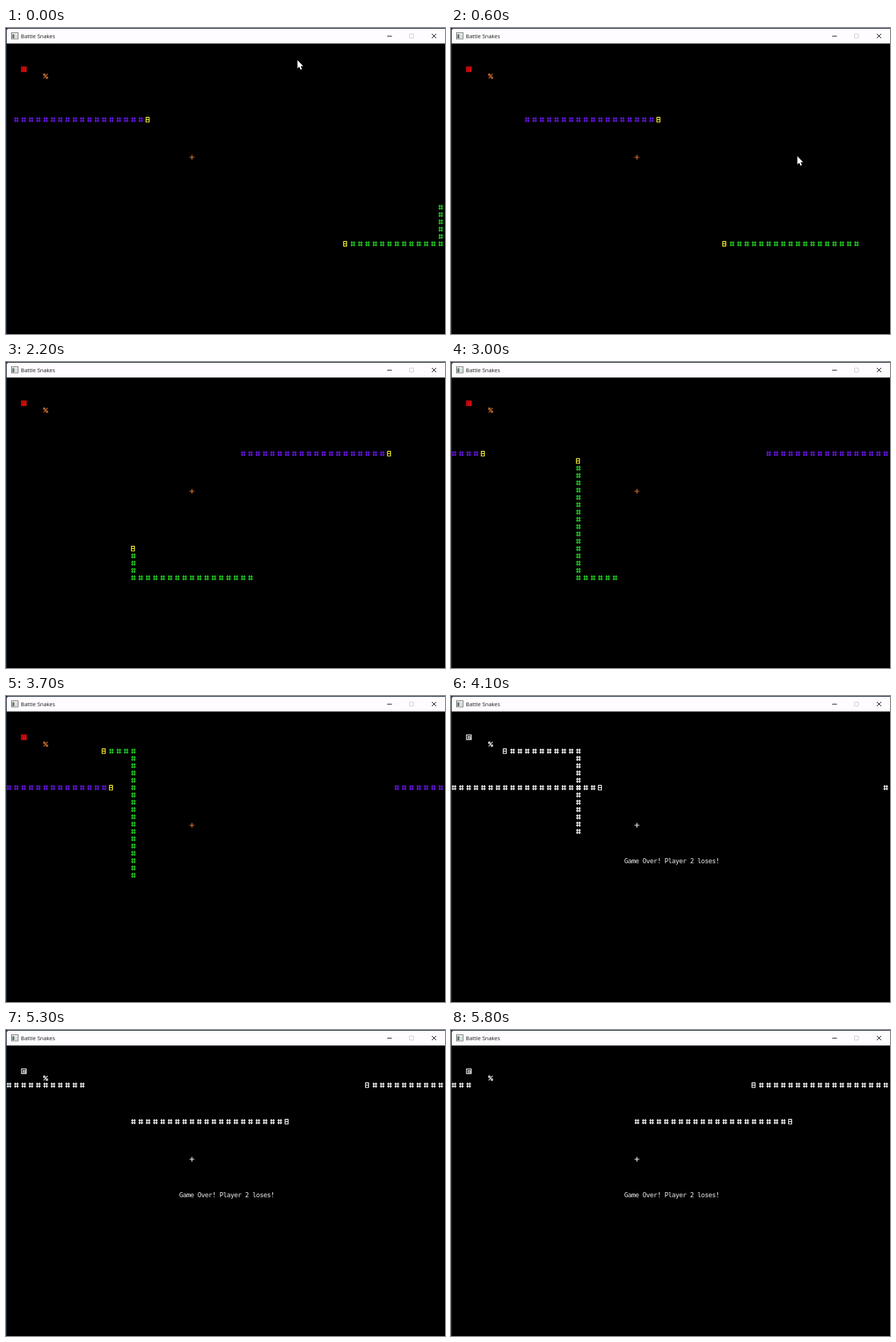
These frames come from a looping animation (600 px wide and 419 px high, 5.9 s). An HTML page:

```html
<!DOCTYPE html>
<html lang="en">
<head>
<meta charset="utf-8">
<title>Battle Snakes</title>
<style>
  html, body { margin: 0; width: 100%; height: 100%; overflow: hidden; background: #000; }
  svg { display: block; }
  .glyph { fill: none; stroke-width: 1.15; }
  .title { font: 7.5px "Open Sans", "Noto Sans", sans-serif; fill: #1a1a1a; }
  .message { font: 9px "DejaVu Sans Mono", monospace; letter-spacing: -0.42px; fill: #f2f2f2; }
</style>
</head>
<body>
<svg width="600" height="419" viewBox="0 0 600 419">
  <rect width="600" height="419" fill="#283246"/>
  <path d="M1 419V3.500Q1 1 3.500 1H600V419Z" fill="#000"/>
  <path d="M1 21.300V3.500Q1 1 3.500 1H600V21.300Z" fill="#fefcfe"/>

  <rect x="7.500" y="6.500" width="9" height="8.500" fill="#f4f6f4" stroke="#777" stroke-width="0.900"/>
  <rect x="8.500" y="8.500" width="3" height="5.500" fill="#64756e"/>
  <rect x="12.500" y="8.500" width="3" height="5.500" fill="#d3dbd7"/>
  <text class="title" x="20.300" y="14">Battle Snakes</text>
  <g fill="none" stroke="#222" stroke-width="1">
    <path d="M521 11.200H527.500"/>
    <rect x="551.500" y="8.300" width="5.500" height="5.500" rx="0.800" stroke="#cfcdcf"/>
    <path d="M582 8L588 14M588 8L582 14"/>
  </g>

  <g class="glyph">
    <g id="at">
      <rect x="21.200" y="53.300" width="6.400" height="6.400" fill="#900"/>
      <path d="M27.500 58H23.500V55.500H26V58"/>
    </g>
    <path id="percent" d="M56.800 62.800L51.500 69M51.500 63H53.300V65H51.500ZM55 67H56.800V69H55Z"/>
    <path id="plus" d="M250.800 177H257.400M254.100 173.700V180.300"/>
    <path id="body1"/>
    <path id="body2"/>
    <path id="heads"/>
  </g>
  <text class="message" id="message" x="236.800" y="229">Game Over! Player 2 loses!</text>
  <path id="cursor" d="M0 0V11.200L2.500 8.900L4.300 13L6.200 12.200L4.400 8.200H7.800Z" fill="#fff"/>
</svg>
<script>
const LOOP = 5900, TICK = 100, COLUMNS = 60;
const STEPS_PER_TICK = 1.5, CRASH_STEP = 58, GROW_EVERY = 15;
const WHITE = "#f2f2f2";
const COLORS = {
  at: "#e81212", percent: "#d97530", plus: "#d97530",
  body1: "#6415dc", body2: "#20c722", heads: "#f2ea30"
};
const el = id => document.getElementById(id);

// Head cell [column, row] of each snake after a number of steps.
const purple = s => [19 + s, 12];
function green(s) {
  if (s < -13) return [59, 42 + s];
  if (s <= 29) return [46 - s, 29];
  if (s <= 51) return [17, 58 - s];
  return [68 - s, 7];
}

function place([column, row]) {
  const wrapped = (column + 2 * COLUMNS) % COLUMNS;
  return [wrapped * 10 + 4.2, row * 10 + 5.5];
}

function hash(cell) {
  const [x, y] = place(cell);
  return `M${x - 1.5} ${y - 3.5}v7m3 0v-7M${x - 3.2} ${y - 1.6}h6.4m0 3.200h-6.400`;
}

function head(cell) {
  const [x, y] = place(cell);
  return `M${x - 2.8} ${y - 3.2}h4.200v6.400h-4.200zm0 3.200h4.200`;
}

function body(route, step, length) {
  return Array.from({ length }, (_, i) => hash(route(step - 1 - i))).join("");
}

function render(time) {
  const tick = Math.floor((time % LOOP) / TICK);
  const step = Math.floor(tick * STEPS_PER_TICK);
  const over = step >= CRASH_STEP;
  const length = 18 + Math.floor(Math.min(step, CRASH_STEP) / GROW_EVERY);

  el("body1").setAttribute("d", body(purple, step, length));
  el("body2").setAttribute("d", body(green, step, length));
  el("heads").setAttribute("d", head(purple(step)) + head(green(step)));

  for (const id in COLORS) el(id).setAttribute("stroke", over ? WHITE : COLORS[id]);
  el("at").firstElementChild.setAttribute("fill", over ? "none" : "#900");
  el("message").style.display = over ? "" : "none";

  const p = Math.min(tick / 6, 1);
  const ease = p * p * (3 - 2 * p);
  el("cursor").setAttribute("transform", `translate(${398.4 + 75 * ease} ${44 + 131.5 * ease})`);
  el("cursor").style.display = tick < 8 ? "" : "none";
}

const start = performance.now();
function loop() {
  render(performance.now() - start);
  requestAnimationFrame(loop);
}
loop();
</script>
</body>
</html>
```
